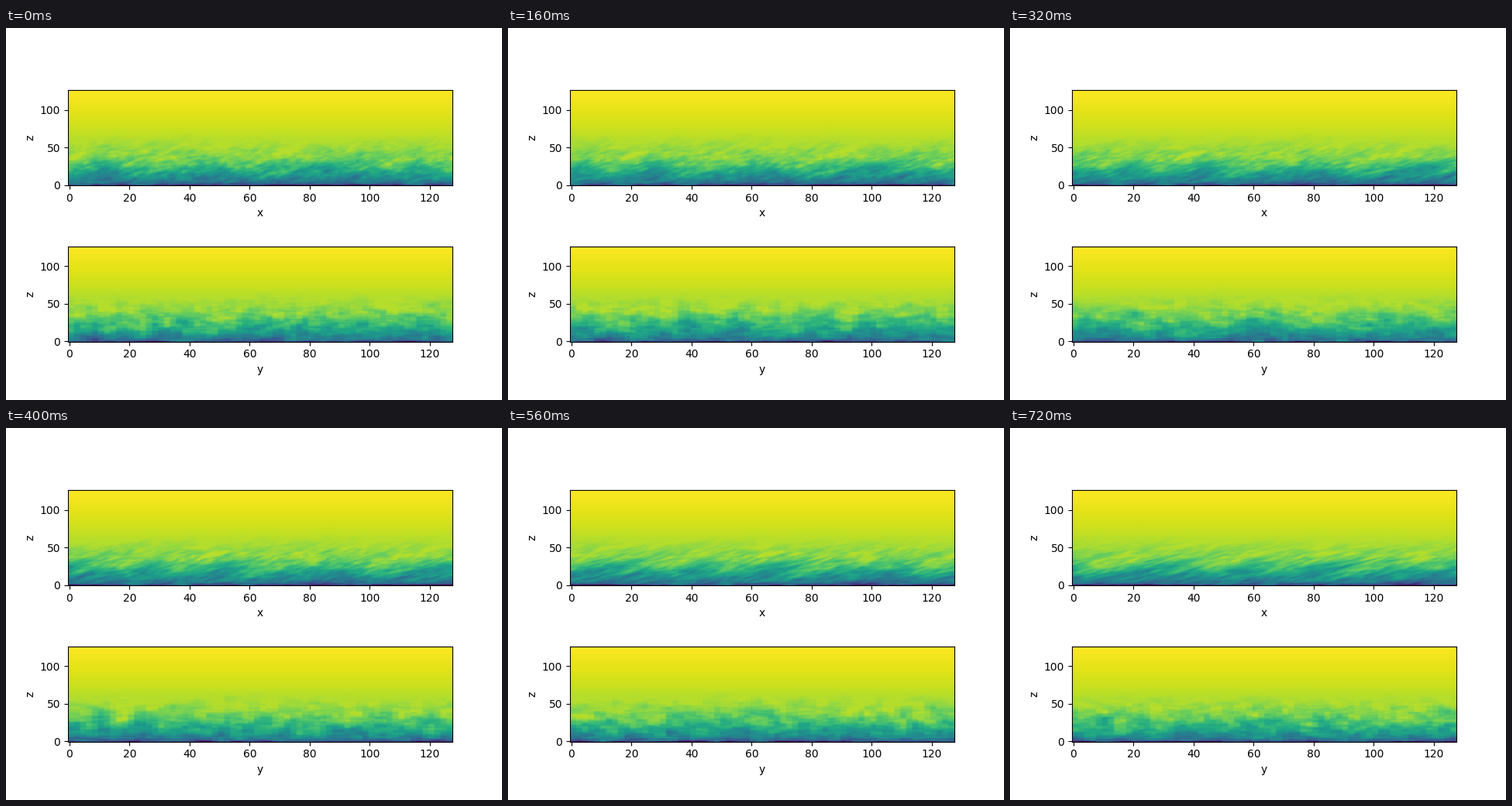
Write a matplotlib script that moves like this. It is 640 by 480 pixels and loops after 800 ms.

```python
import numpy as np
import matplotlib.pyplot as plt
from matplotlib.animation import FuncAnimation

NX, NZ = 128, 127
FRAMES, INTERVAL = 10, 80
z = np.arange(NZ)[:, None]
x = np.arange(NX)[None, :]

# Mean velocity: linear outer flow, boundary layer and thin wall layer
mean = (1 - 0.182 * (1 - z / 126) - 0.44 * np.exp(-(z / 24) ** 1.3)
        - 0.2 * np.exp(-z / 1.5))
# Eddies drift faster with height (cells per frame)
drift = 6.8 + 0.05 * np.minimum(z, 60)
strength = 0.06 * np.exp(-(z / 50) ** 4) * (1 - 0.5 * np.exp(-z / 4))
wall = 0.08 * np.exp(-z / 3)


def noise(rng, width, lx, lz, slant=0.0):
    """Smooth periodic noise with unit spread; slant leans it downstream."""
    kx = 2 * np.pi * np.fft.fftfreq(width)[None, :]
    kz = 2 * np.pi * np.fft.fftfreq(NZ)[:, None]
    keep = np.exp(-((kx * lx) ** 2 + ((kz + slant * kx) * lz) ** 2) / 2)
    keep[0, 0] = 0
    field = np.fft.ifft2(np.fft.fft2(rng.normal(size=(NZ, width))) * keep).real
    return field / field.std()


def bump(cx, cz, width, height):
    dx = (x - cx + NX / 2) % NX - NX / 2
    return np.exp(-(dx / width) ** 2 - ((z - cz) / height) ** 2)


def carry(field, t):
    """Shift every row to the right by its own drift."""
    k = np.fft.rfftfreq(NX)[None, :]
    phase = np.exp(-2j * np.pi * k * drift * t)
    return np.fft.irfft(np.fft.rfft(field, axis=1) * phase, NX, axis=1)


def blend(pair, angle):
    return pair[0] * np.cos(angle) + pair[1] * np.sin(angle)


def velocity(eddies, streaks):
    u = mean + strength * eddies + wall * streaks
    return np.clip(u, 0, np.maximum(mean, 0.89))


rng = np.random.default_rng(12)
# Finer layers are weaker and turn over faster
layers = []
for n in range(4):
    scale = 2.0 ** -n
    pair = [noise(rng, NX, 4 * scale, 8 * scale, 0.3) for _ in range(2)]
    layers.append((0.5, 0.07 * (n + 1), pair))
streak_pair = [noise(rng, NX, 2, 0.7) for _ in range(2)]

# Slow and fast patches in the x plane
patches = (sum(bump(c, 18, 7, 12) for c in (70, 106))
           - sum(bump(c, 18, 7, 12) for c in (14, 57, 88, 120))
           - 1.5 * bump(18, 46, 4, 4))


def x_plane(t):
    eddies = patches + sum(w * blend(pair, rate * t)
                           for w, rate, pair in layers)
    return velocity(carry(eddies, t), carry(blend(streak_pair, 0.15 * t), t))


def y_plane(t):
    """Fresh slice on columns two cells wide, with slow plumes rising."""
    rng = np.random.default_rng(40 + t)

    def wide(lx, lz):
        return np.repeat(noise(rng, NX // 2, lx, lz), 2, axis=1)

    fine = 0.6 * wide(0.9, 5) + 0.6 * wide(0.6, 2.5) + 0.4 * wide(0.5, 0.9)
    centres = np.arange(8, NX, 16) + rng.uniform(-5, 5, 8)
    tops = rng.uniform(20, 36, 8)
    plumes = sum(bump(c, top, 3, 14) for c, top in zip(centres, tops))
    return velocity(fine + 0.2 - plumes, wide(0.8, 0.8))


planes = [(x_plane(t), y_plane(t)) for t in range(FRAMES)]

fig, axes = plt.subplots(2, 1, figsize=(6.4, 4.8), dpi=100)
images = []
for ax, name, plane in zip(axes, "xy", planes[0]):
    images.append(ax.imshow(plane, origin="lower", aspect=0.25,
                            cmap="viridis", vmin=0, vmax=1))
    ax.set_xlabel(name)
    ax.set_ylabel("z")
    ax.set_xticks(range(0, 121, 20))
    ax.set_yticks([0, 50, 100])


def update(t):
    for image, plane in zip(images, planes[t]):
        image.set_data(plane)
    return images


anim = FuncAnimation(fig, update, frames=FRAMES, interval=INTERVAL,
                     repeat=True, repeat_delay=0)
plt.show()
```
